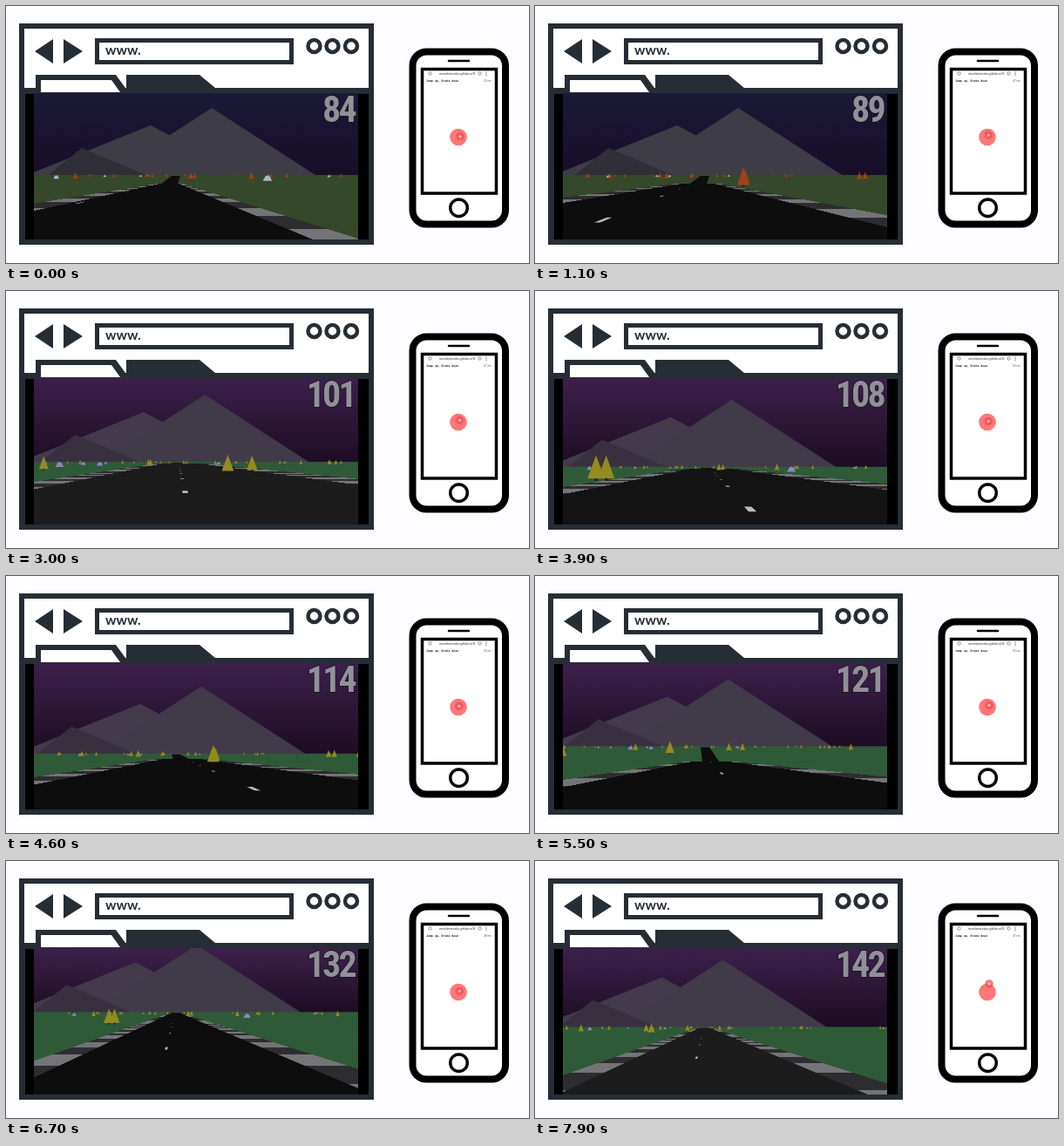
Recreate the animation shown at these times as an HTML page with a canvas. Size 600x295 px, loop 8000 ms.

```html
<!DOCTYPE html>
<html lang="en">
<head>
<meta charset="utf-8">
<title>Phone controlled racer</title>
<style>
  html, body { margin: 0; width: 100%; height: 100%; overflow: hidden; background: #fdfcfe; }
  svg, canvas { position: absolute; left: 0; top: 0; }
  canvas { left: 32px; top: 100px; }
  .www { font: 700 15.5px Lato, "Open Sans", sans-serif; fill: #272d35; }
  #score {
    font: 700 42px "Liberation Sans Narrow", "Roboto Condensed", Roboto, sans-serif;
    font-stretch: condensed; letter-spacing: -2.8px; text-anchor: end;
    fill: #918f97; stroke: #15121c; stroke-width: 1.5; paint-order: stroke;
  }
  .url { font: 3.4px Roboto, sans-serif; fill: #333; }
  .hint { font: 700 3.25px "DejaVu Sans Mono", monospace; fill: #222; }
  #ping { font: 3.2px "Liberation Sans", sans-serif; fill: #555; }
</style>
</head>
<body>
<svg width="600" height="295" viewBox="0 0 600 295">
  <!-- browser window -->
  <path fill="#272d35" d="M15 20H422V274H15Z"/>
  <path fill="#fff" d="M21 26H416V94H240L222 79H138V94H137L126 79H34V94H21Z"/>
  <path fill="#fff" d="M40 99V85H121L131 99Z"/>
  <path d="M22 101H416V268H22Z"/>
  <path fill="#272d35" d="M33 52L54 38V66ZM88 52L66 38V66Z"/>
  <path fill="none" stroke="#272d35" stroke-width="5" d="M104.500 39.500H327.500V64.500H104.500Z"/>
  <text class="www" x="114" y="56">www.</text>
  <g fill="none" stroke="#272d35" stroke-width="4.500">
    <circle cx="353.500" cy="46" r="7"/>
    <circle cx="374.500" cy="46" r="7"/>
    <circle cx="396" cy="46" r="7"/>
  </g>

  <!-- phone -->
  <g fill="#fff" stroke="#000">
    <rect x="466.500" y="52.500" width="106.500" height="198" rx="16" stroke-width="8"/>
    <path d="M508 63H531" stroke-width="2.500" stroke-linecap="round"/>
    <rect x="477.500" y="72.500" width="85" height="142.500" stroke-width="3.500"/>
    <circle cx="519.500" cy="231.700" r="9.800" stroke-width="3.500"/>
  </g>
  <g fill="none" stroke="#666" stroke-width=".7">
    <circle cx="486.500" cy="77.500" r="1.700"/>
    <circle cx="543.500" cy="77.500" r="1.700"/>
  </g>
  <path d="M551 75.500V80" stroke="#555" stroke-dasharray="1 .7"/>
  <text class="url" x="497" y="79">merolintavesko.github.io/Sl</text>
  <text class="hint" x="482" y="87">Jump up, Brake down</text>
  <text id="ping" x="548" y="86.500"></text>
  <circle cx="519" cy="150.500" r="9.800" fill="#ff7878"/>
  <g id="knob">
    <circle r="4.800" fill="#ee4f57" fill-opacity=".75"/>
    <circle r="1.600" fill="#ffb9b9"/>
  </g>
</svg>
<canvas id="game" width="372" height="168"></canvas>
<svg width="600" height="295" viewBox="0 0 600 295"><text id="score" x="400" y="132.500"></text></svg>

<script>
const LOOP = 8000, STEP = 100, BOTTOM = 268;
const GAP = 1.6, NEAR = 4, RANGE = 40, PROPS = 48, VERGE = .75;
const byId = id => document.getElementById(id);
const ctx = byId('game').getContext('2d');
ctx.translate(-32, -100);

const lerp = (a, b, u) => a + (b - a) * u;
const mix = (a, b, u) => `rgb(${a.map((v, i) => Math.round(lerp(v, b[i], u)))})`;
const rnd = n => { const s = Math.sin(n * 127.1 + 11.7) * 43758.5453; return s - Math.floor(s); };
const bump = (t, mid, width) => Math.exp(-(((t - mid) / width) ** 2));
const ease = (t, from, to) => {
  const u = Math.min(Math.max((t - from) / (to - from), 0), 1);
  return u * u * (3 - 2 * u);
};

function poly(color, ...pts) {
  ctx.fillStyle = color;
  ctx.beginPath();
  for (let i = 0; i < pts.length; i += 2) ctx.lineTo(pts[i], pts[i + 1]);
  ctx.fill();
}

// camera and track state after t seconds
function poseAt(t) {
  const drop = ease(t, 5.5, 6.6);
  const horizon = 194 + 10 * bump(t, 4.5, 1.2) - 21 * bump(t, 6.7, .9);
  const skew = lerp(-1.5, 1.6, ease(t, 1, 2.9)) * (1 - .9 * drop);
  return {
    horizon, skew,
    crest: horizon + 2 + 10 * bump(t, .5, 1.2) + 16 * bump(t, 5.4, .7),
    spread: lerp(lerp(4.7, 8.3, ease(t, 0, 2)), 3, drop),
    mid: 194 + 5 * skew,
    peak: 236 - 2.6 * t,
    lane: .42 + .17 * bump(t, 4.7, .8) - .35 * bump(t, 0, .8),
    shade: Math.round(13 + 15 * Math.max(0, Math.cos((t - 3) * 2 * Math.PI / 4.9))),
    dist: 8.37 * t - 8.05 * (1 - Math.exp(-t * t / 2)),
    dusk: ease(t, 1, 2.9)
  };
}

function drawSky({ horizon, peak: x, dusk }) {
  const g = ctx.createLinearGradient(0, 100, 0, horizon);
  g.addColorStop(0, mix([27, 25, 56], [60, 32, 76], dusk));
  g.addColorStop(1, mix([24, 14, 40], [29, 13, 35], dusk));
  ctx.fillStyle = g;
  ctx.fillRect(32, 100, 372, 168);
  const y = horizon + 2;
  poly(mix([62, 61, 70], [67, 58, 75], dusk), x - 217, y, x - 70, y - 59, x + 40, y);
  poly(mix([62, 61, 71], [65, 58, 73], dusk), x - 122, y, x, y - 79, x + 122, y);
  poly(mix([48, 47, 56], [56, 48, 63], dusk), x - 190, y, x - 149, y - 33, x - 70, y);
}

function drawRoad(p) {
  const { horizon, crest, spread, skew, mid, dist } = p;
  ctx.fillStyle = mix([53, 72, 41], [47, 90, 56], p.dusk);
  ctx.fillRect(32, horizon, 372, BOTTOM - horizon);
  const road = `rgb(${p.shade},${p.shade},${p.shade})`;
  poly(road, 190, horizon + 1, 200, horizon + 1, mid + 10, crest + 1, mid - 10, crest + 1);

  const depth = BOTTOM - horizon;
  const edges = (y, scale) => {
    const side = slope => scale * (4 * spread + slope * (y - crest));
    return [mid - side(spread - skew), mid + side(spread + skew)];
  };
  const row = (y, scale, color) => {
    const [a, b] = edges(y, scale);
    ctx.fillStyle = color;
    ctx.fillRect(a, y, b - a, 1);
  };
  for (let y = Math.round(crest); y < BOTTOM; y++) {
    const z = depth / Math.max(y - horizon, 1);
    row(y, 1, Math.floor((z + dist * GAP) * 2.5) & 1 ? '#2d2c30' : '#747477');
    row(y, VERGE, road);
  }

  // lane dashes
  const dashEnd = z => {
    const y = horizon + depth / z, [a, b] = edges(y, VERGE);
    return { y, x: lerp(a, b, p.lane), w: (b - a) * .007 };
  };
  for (let z = GAP * (1 - (dist + .6) % 1); z < 12; z += GAP) {
    const a = dashEnd(z), b = dashEnd(z + .16);
    if (b.y < crest) break;
    poly('#b9b9b9', a.x - a.w, a.y, a.x + a.w, a.y, b.x + b.w, b.y, b.x - b.w, b.y);
  }
}

function drawTree(x, y, s, color) {
  poly('#241a12', x - s * .05, y - s * .15, x + s * .05, y - s * .15, x + s * .05, y, x - s * .05, y);
  poly(color, x - s * .33, y - s * .1, x, y - s, x + s * .33, y - s * .1);
}

function drawRock(x, y, s, color) {
  poly(color, x - s * .8, y, x - s * .3, y - s * .85, x + s * .1, y - s, x + s * .5, y - s * .75, x + s * .85, y);
}

// seeded trees and rocks, recycled to the far end once passed
function drawProps({ horizon, dist, dusk }) {
  const leaf = mix([160, 64, 25], [148, 138, 32], dusk);
  const stone = mix([166, 188, 205], [141, 132, 196], dusk);
  Array.from({ length: PROPS }, (_, i) => {
    const z = NEAR + ((rnd(i) * RANGE - dist * GAP) % RANGE + RANGE) % RANGE;
    const side = i & 1 ? 1 : -1;
    return { z, x: 195 + side * (200 + 7000 * rnd(i + 50) ** 1.5) / z, rock: rnd(i + 90) < .22 };
  }).sort((a, b) => b.z - a.z).forEach(({ z, x, rock }) => {
    const y = horizon + (BOTTOM - horizon) / z;
    if (rock) drawRock(x, y, 70 / z, stone);
    else drawTree(x, y, 120 / z, leaf);
  });
}

function drawPhone(t) {
  const lift = ease(t, 7.3, 7.8);
  const x = 520 + Math.sin(t * 4.5 + 1.5) * (1 - lift) + lift;
  const y = lerp(149 + Math.cos(t * 3) * .8, 141, lift);
  byId('knob').setAttribute('transform', `translate(${x} ${y})`);
  byId('ping').textContent = 47 + Math.floor(rnd(t) * 12) + ' ms';
}

function frame(now) {
  const t = Math.floor(now % LOOP / STEP) * STEP / 1000;
  const pose = poseAt(t);
  drawSky(pose);
  drawRoad(pose);
  drawProps(pose);
  drawPhone(t);
  byId('score').textContent = Math.floor(84 + pose.dist);
  requestAnimationFrame(frame);
}
frame(0);
</script>
</body>
</html>
```
